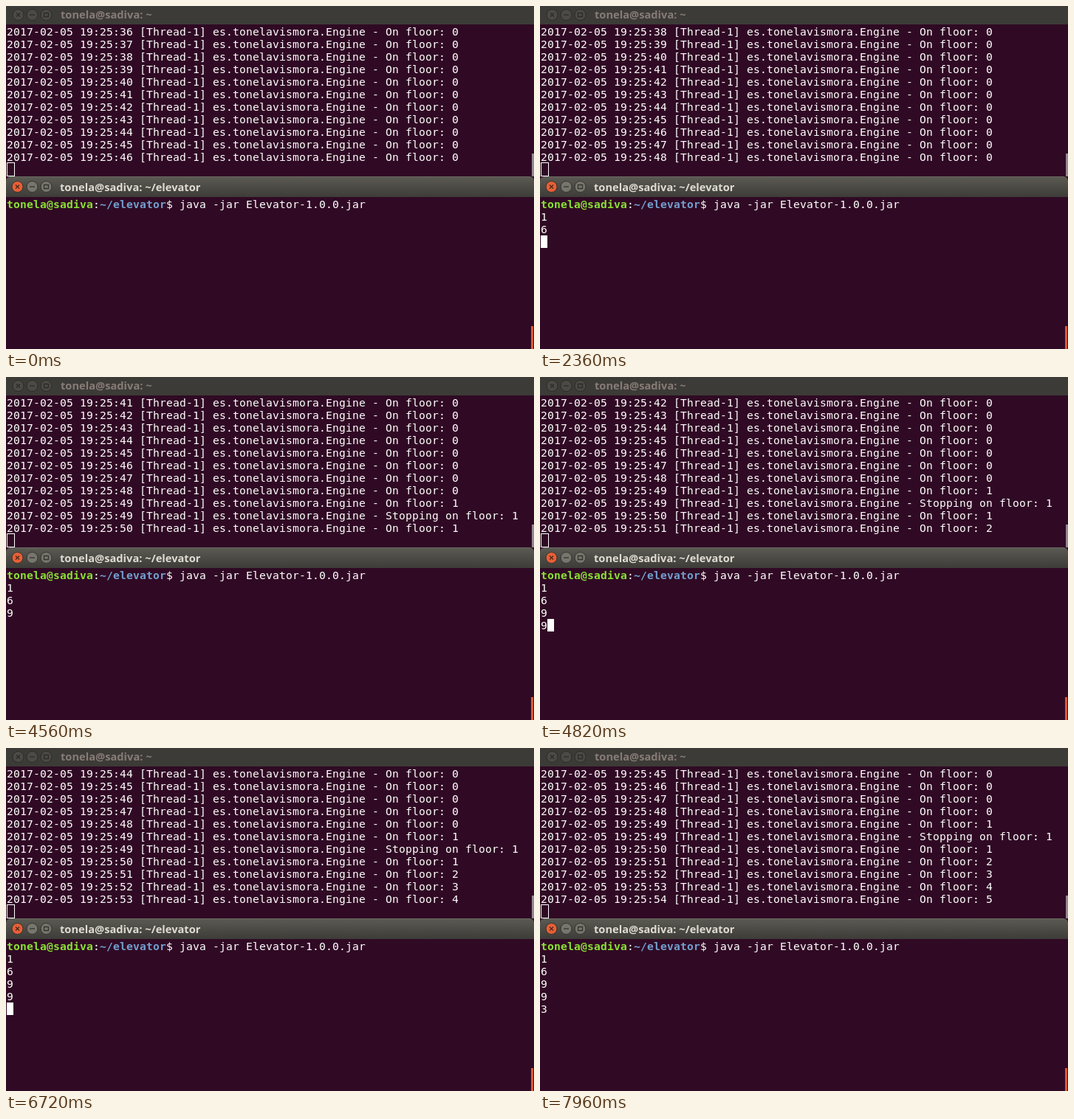
Animation, 715 px wide and 465 px high, one loop 8000 ms. Source, as an HTML page with a canvas:

```html
<!DOCTYPE html>
<html lang="en">
<head>
<meta charset="utf-8">
<title>Elevator terminals</title>
<style>
  html, body { margin: 0; width: 100%; height: 100%; overflow: hidden; background: #300a24; }
  canvas { display: block; }
</style>
</head>
<body>
<canvas id="stage" width="715" height="465"></canvas>
<script>
const ctx = document.getElementById('stage').getContext('2d');
const LOOP = 8000, CELL_W = 9, CELL_H = 17, LEFT = 1, ROWS = 11;
const LOG_TOP = 26, SHELL_TOP = 260;
const MONO = '14.667px "DejaVu Sans Mono", monospace';
const WHITE = '#ffffff', PURPLE = '#300a24';
const USER = 'tonela@sadiva';

// Time of each new second in the log
const ticks = [820, 1800, 2790, 3770, 4740, 5720, 6720, 7690];

// Time, text typed so far, cursor lit
const typing = [
  [0, '', false], [470, '', true], [690, '1', true],
  [1060, '1\n', true], [1630, '1\n', false], [1840, '1\n6', true],
  [2360, '1\n6\n', true], [2920, '1\n6\n', false], [3310, '1\n6\n', true],
  [3350, '1\n6\n9', true], [3930, '1\n6\n9', false], [3970, '1\n6\n9', true],
  [4010, '1\n6\n9\n', true], [4560, '1\n6\n9\n', false], [4780, '1\n6\n9\n', true],
  [4820, '1\n6\n9\n9', true], [5230, '1\n6\n9\n9\n', true], [5800, '1\n6\n9\n9\n', false],
  [6400, '1\n6\n9\n9\n', true], [6990, '1\n6\n9\n9\n', false], [7080, '1\n6\n9\n9\n', true],
  [7120, '1\n6\n9\n9\n3', true], [7390, '1\n6\n9\n9\n3\n', true], [7960, '1\n6\n9\n9\n3\n', false]
];

const entry = (second, message) =>
  `2017-02-05 19:25:${second} [Thread-1] es.tonelavismora.Engine - ${message}`;

function logUntil(last) {
  const lines = [];
  for (let s = 36; s <= last; s++) {
    const floor = s < 49 ? 0 : Math.max(1, s - 49);
    lines.push(entry(s, 'On floor: ' + floor));
    if (s === 49) lines.push(entry(s, 'Stopping on floor: 1'));
  }
  return lines.slice(-ROWS);
}

function rect(x, y, w, h, color) {
  ctx.fillStyle = color;
  ctx.fillRect(x, y, w, h);
}

function write(text, col, top, color = WHITE, weight = '') {
  ctx.font = weight + ' ' + MONO;
  ctx.fillStyle = color;
  [...text].forEach((ch, i) => ctx.fillText(ch, LEFT + (col + i) * CELL_W, top + 14));
}

function button(x, y, kind, fill, edge, mark) {
  ctx.beginPath();
  ctx.arc(x, y, 7.5, 0, Math.PI * 2);
  ctx.fillStyle = fill;
  ctx.fill();
  ctx.strokeStyle = edge;
  ctx.lineWidth = 1;
  ctx.stroke();
  ctx.beginPath();
  if (kind === 'close') {
    ctx.moveTo(x - 2.5, y - 2.5); ctx.lineTo(x + 2.5, y + 2.5);
    ctx.moveTo(x + 2.5, y - 2.5); ctx.lineTo(x - 2.5, y + 2.5);
  } else if (kind === 'minimize') {
    ctx.moveTo(x - 3.5, y); ctx.lineTo(x + 3.5, y);
  } else {
    ctx.rect(x - 3, y - 2.5, 6, 5);
  }
  ctx.strokeStyle = mark;
  ctx.lineWidth = 1.3;
  ctx.stroke();
}

function titleText(text, x, baseline, color) {
  ctx.font = 'bold 14.667px "Open Sans", sans-serif';
  ctx.fillStyle = color;
  ctx.fillText(text, x, baseline);
}

function logWindow(t) {
  rect(0, 0, 715, 25, '#3c3b37');
  button(16.5, 12, 'close', '#4b4a45', '#2c2b28', '#2c2b28');
  button(35.5, 12, 'minimize', '#4b4a45', '#2c2b28', '#2c2b28');
  button(54.5, 12, 'maximize', '#4b4a45', '#2c2b28', '#2c2b28');
  titleText(USER + ': ~', 74, 17, '#877b77');
  const last = 46 + ticks.filter(tick => tick <= t).length;
  logUntil(last).forEach((line, i) => write(line, 0, LOG_TOP + i * CELL_H));
  ctx.strokeStyle = WHITE;
  ctx.lineWidth = 1;
  ctx.strokeRect(LEFT + .5, LOG_TOP + ROWS * CELL_H - .5, 10, 18);
  rect(712, 200, 3, 31, '#958790');
}

function shellWindow(t) {
  const bar = ctx.createLinearGradient(0, 231, 0, 259);
  bar.addColorStop(0, '#5b5a53');
  bar.addColorStop(1, '#3d3c38');
  ctx.fillStyle = bar;
  ctx.beginPath();
  ctx.roundRect(0, 231, 715, 28, [6, 6, 0, 0]);
  ctx.fill();
  rect(5, 231, 705, 1, '#6b6a63');
  button(15.5, 245, 'close', '#e95f35', '#34332f', '#49281c');
  button(35.5, 245, 'minimize', '#77756c', '#34332f', '#34332f');
  button(54.5, 245, 'maximize', '#77756c', '#34332f', '#34332f');
  titleText(USER + ': ~/elevator', 73, 251, '#dfdbd2');

  write(USER, 0, SHELL_TOP, '#8ae234', 'bold');
  write(':', 13, SHELL_TOP);
  write('~/elevator', 14, SHELL_TOP, '#729fcf', 'bold');
  write('$ java -jar Elevator-1.0.0.jar', 24, SHELL_TOP);

  const [, text, lit] = typing.findLast(step => step[0] <= t);
  const lines = text.split('\n');
  const rowTop = i => SHELL_TOP + (i + 1) * CELL_H;
  lines.forEach((line, i) => write(line, 0, rowTop(i)));
  if (lit) {
    const row = lines.length - 1;
    rect(LEFT + lines[row].length * CELL_W, rowTop(row), CELL_W, CELL_H, WHITE);
  }
  rect(711, 434, 3, 31, '#df5835');
}

function draw(now) {
  const t = now % LOOP;
  rect(0, 0, 715, 465, PURPLE);
  logWindow(t);
  shellWindow(t);
}

let start;
function tick(now) {
  start ??= now;
  draw(now - start);
  requestAnimationFrame(tick);
}
draw(0);
requestAnimationFrame(tick);
</script>
</body>
</html>
```
